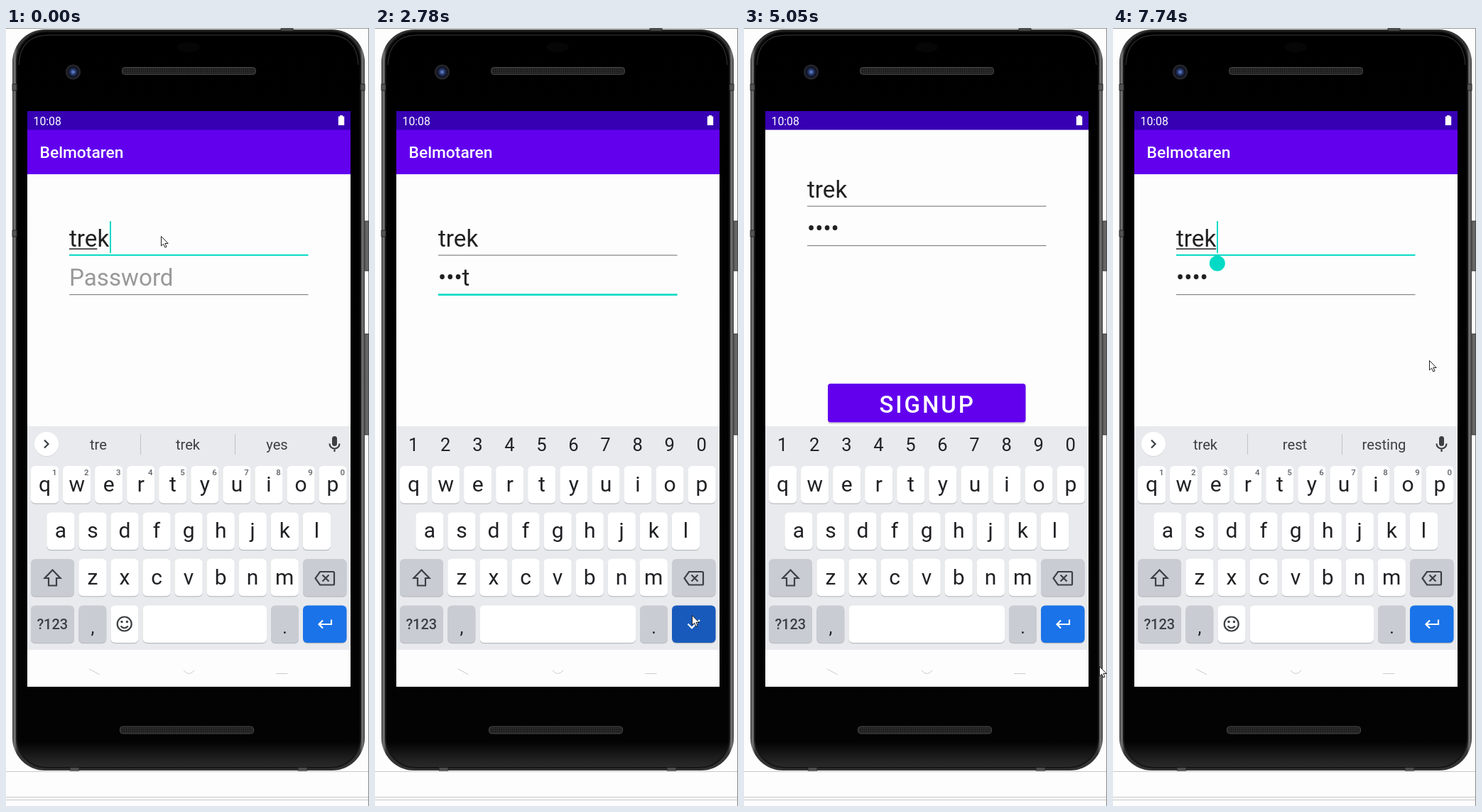
Animation of 511 by 1096 pixels, one loop 8 s. Source, as an HTML page:

```html
<!DOCTYPE html>
<html lang="en">
<head>
<meta charset="utf-8">
<title>Login form</title>
<style>
html, body { margin: 0; width: 100%; height: 100%; overflow: hidden; background: #fdfdfd }
svg { display: block; width: 100%; height: 100% }
text { font-family: Roboto, "Noto Sans", sans-serif; fill: #202124 }
.mid { text-anchor: middle }
.field { font-size: 33.2px; fill: #212121 }
.icon { fill: none; stroke: #3c4043; stroke-width: 2.2 }
.teal { fill: #03dac5 }
</style>
</head>
<body>
<svg viewBox="0 0 511 1096">
  <defs>
    <linearGradient id="metal">
      <stop offset="0" stop-color="#3a3a3a"/><stop offset=".006" stop-color="#777"/>
      <stop offset=".014" stop-color="#333"/><stop offset=".986" stop-color="#333"/>
      <stop offset=".994" stop-color="#777"/><stop offset="1" stop-color="#3a3a3a"/>
    </linearGradient>
    <linearGradient id="lip" x2="0" y2="1">
      <stop offset="0" stop-color="#000"/><stop offset=".965" stop-color="#030303"/>
      <stop offset=".985" stop-color="#1c1c1c"/><stop offset="1" stop-color="#2b2b2b"/>
    </linearGradient>
    <radialGradient id="lens">
      <stop offset="0" stop-color="#6f8fd8"/><stop offset=".35" stop-color="#26386e"/>
      <stop offset=".65" stop-color="#10131f"/><stop offset="1" stop-color="#303034"/>
    </radialGradient>
    <pattern id="mesh" width="3" height="3" patternUnits="userSpaceOnUse">
      <rect width="3" height="3" fill="#2c2c2c"/><circle cx="1.5" cy="1.5" r=".9" fill="#111"/>
    </pattern>
    <clipPath id="window"><rect x="30" y="143" width="455" height="418"/></clipPath>
  </defs>

  <!-- phone -->
  <path d="M0 .5H511" stroke="#999"/>
  <path d="M0 1047.5H511M0 1083.5H511M0 1087.5H511" stroke="#c8c8c8"/>
  <path d="M510.5 0V1096" stroke="#888"/>
  <path d="M505 272h6v70h-6zM505 431h6v142h-6z" fill="#666" stroke="#333"/>
  <rect x="9" y="2" width="496" height="1044" rx="46" fill="url(#metal)"/>
  <rect x="15" y="5" width="484" height="1037" rx="42" fill="url(#lip)" stroke="#151515" stroke-width="2"/>
  <path d="M18 52Q20 10 60 10H454Q494 10 496 52" fill="none" stroke="#272727" stroke-width="1.5"/>
  <path d="M9 79h6v9h-6zM499 79h6v9h-6zM9 285h6v9h-6zM387 1h17v3h-17zM90 1042h13v4h-13zM411 1042h13v4h-13z" fill="#555" stroke="#222"/>
  <ellipse cx="257" cy="27" rx="16" ry="7" fill="#060606"/>
  <circle cx="94.500" cy="62" r="10.5" fill="url(#lens)"/>
  <g fill="url(#mesh)" stroke="#484848">
    <rect x="163.500" y="55.500" width="188" height="10" rx="4"/>
    <rect x="160.500" y="984" width="188" height="10" rx="4"/>
  </g>

  <!-- screen -->
  <rect x="30" y="117" width="455" height="811" fill="#fdfdfd"/>
  <g clip-path="url(#window)"><g id="page">
    <rect x="30" y="143" width="455" height="63" fill="#6200ee"/>
    <text x="47.500" y="183" font-size="22.8" font-weight="500" style="fill:#fff">Belmotaren</text>
    <text id="user" class="field" x="89" y="308">trek</text>
    <rect id="spell" x="89" y="310.500" height="1.5" fill="#212121"/>
    <text id="hint" class="field" x="89" y="363" style="fill:#999">Password</text>
    <text id="pass" class="field" x="89" y="363"></text>
    <rect id="userLine" x="89" width="336.500"/>
    <rect id="passLine" x="89" width="336.500"/>
    <rect id="caret" class="teal" width="2" height="45"/>
    <path id="handle" class="teal" d="M0 0L7.800 5.200A11 11 0 1 1 -7.800 5.200Z"/>
    <rect x="118" y="572" width="278.500" height="55" rx="4" fill="#ddd"/>
    <rect x="118" y="570" width="278.500" height="54.500" rx="4" fill="#6200ee"/>
    <rect id="glow" x="118" y="570" width="278.500" height="54.500" rx="4" fill="#fff"/>
    <text x="190.500" y="610.500" font-size="33" font-weight="500" letter-spacing="2.9" style="fill:#fff">SIGNUP</text>
  </g></g>
  <rect x="30" y="117" width="455" height="26.500" fill="#3700b3"/>
  <text x="38.500" y="136.500" font-size="15.800" style="fill:#fff">10:08</text>
  <path d="M470 123h4v1.500h2.200v12.500h-8.400v-12.500h2.200z" fill="#fff"/>

  <!-- keyboard -->
  <rect x="30" y="561" width="455" height="315" fill="#e8eaed"/>
  <g id="keys"></g>
  <g id="words">
    <circle cx="57" cy="587" r="17" fill="#d5d7da"/>
    <circle cx="57" cy="586" r="17" fill="#fff"/>
    <path class="icon" d="M54 580.500l5.500 5.500l-5.500 5.500"/>
    <path d="M189.500 572V601M322.500 572V601" stroke="#bfc2c6"/>
    <rect x="459" y="575" width="7" height="14" rx="3.500" fill="#3c4043"/>
    <path class="icon" stroke-width="2" d="M455.500 585.500a7 7 0 0 0 14 0M462.500 592.500V597"/>
  </g>
  <g id="digits"></g>
  <g id="emoji"></g>
  <g class="icon">
    <path d="M65.500 763.500l11 11.500h-5.500v10.500h-11v-10.500h-5.500z"/>
    <path d="M442 766h18.500q1.500 0 1.500 1.500v15.500q0 1.500-1.500 1.500H442L435.500 775.200zM445.500 770.500l9 9M454.500 770.500l-9 9"/>
  </g>
  <g id="enter"></g>
  <path id="arrow" d="M458 833.500V840H440.500M446 834.500L440.500 840L446 845.500" fill="none" stroke="#fff" stroke-width="2.200"/>
  <path id="check" d="M440.500 839.500L446 845L457 834" fill="none" stroke="#fff" stroke-width="2.400"/>
  <path d="M117 903l15 8M250 905q7.500 9 15 0M380 909.500h16.500" fill="none" stroke="#ccc"/>
  <path id="mouse" d="M0 0V13.500L3.100 10.700L5.300 15.600L7.600 14.600L5.400 10H9.700Z" fill="#fff" stroke="#222"/>
</svg>
<script>
const $ = id => document.getElementById(id);
const set = (id, attrs) => { for (const k in attrs) $(id).setAttribute(k, attrs[k]); };
const show = (id, on) => set(id, { visibility: on ? 'visible' : 'hidden' });
const label = (x, y, size, s, extra = '') =>
  `<text class="mid" x="${x}" y="${y}" font-size="${size}" ${extra}>${s}</text>`;
const key = (x, y, w, fill = '#fff') =>
  `<rect x="${x}" y="${y + 1.3}" width="${w}" height="52.500" rx="6" fill="#b9bcc1"/>
   <rect x="${x}" y="${y}" width="${w}" height="52.500" rx="6" fill="${fill}"/>`;
const PITCH = 45.05, GREY = '#c9ccd3';

let keys = '', hints = '', digits = '';
[['qwertyuiop', 35], ['asdfghjkl', 57.3], ['zxcvbnm', 102.3]].forEach(([row, x0], r) =>
  [...row].forEach((c, i) => {
    const x = x0 + i * PITCH, y = 617 + r * 65.4;
    keys += key(x, y, 39.3) + label(x + 19.6, y + 36, 30, c);
  }));
[...'1234567890'].forEach((d, i) => {
  const x = 54.2 + i * PITCH;
  digits += label(x, 596, 25.5, d);
  hints += label(x + 14, 630, 11.5, d, 'font-weight="500" style="fill:#5f6368"');
});
keys += key(35, 748, 61, GREY) + key(418, 748, 61.5, GREY)
  + key(35, 813.5, 61, GREY) + label(65.3, 847, 20, '?123', 'font-weight="500" style="fill:#3c4043"')
  + key(102.3, 813.5, 39, GREY) + label(122, 853, 25, ',')
  + key(373, 813.5, 39, GREY) + label(392.5, 853, 25, '.')
  + key(147.5, 813.5, 219.5);
$('keys').innerHTML = keys;
$('digits').innerHTML = digits;
$('words').innerHTML += hints + [130, 256, 381.5].map((x, i) =>
  label(x, 594, 20.2, '', `id="word${i}" style="fill:#3c4043"`)).join('');
$('emoji').innerHTML = '<rect x="147" y="813" width="221" height="55" fill="#e8eaed"/>'
  + key(147.5, 813.5, 39) + key(192.700, 813.5, 174.300)
  + `<circle class="icon" cx="166.700" cy="839.500" r="10"/>
     <path class="icon" d="M161.500 842.500q5.200 5.500 10.400 0"/>
     <circle cx="163" cy="836.500" r="1.700" fill="#3c4043"/><circle cx="170.400" cy="836.500" r="1.700" fill="#3c4043"/>`;
$('enter').innerHTML = key(418, 813.5, 61.5, '#1a73e8');
const enterFace = $('enter').lastElementChild;

const steps = [0, ...[[270, 1050, 7], [1340, 1460, 2], [1780, 2780, 8], [2930, 3050, 2],
  [3180, 3960, 7], [4240, 4240, 1], [4630, 5610, 8], [5730, 5850, 2], [6530, 6940, 4], [7220, 7740, 5]]
  .flatMap(([a, b, n]) => Array.from({ length: n }, (_, i) =>
    n > 1 ? Math.round((a + (b - a) * i / (n - 1)) / 10) * 10 : a))];

const path = [[0, 218, 293], [270, 218, 293], [790, 186, 350], [1920, 186, 350], [2640, 447, 831],
  [2930, 445, 822], [3050, 432, 778], [3440, 418, 600], [3960, 421, 401], [4240, 445, 444],
  [4910, 490, 820], [5050, 500, 899], [5190, 470, 883], [5610, 372, 481], [5730, 372, 440],
  [5850, 372, 399], [6800, 228, 285], [6940, 222, 282], [7220, 222, 240], [7740, 445, 468]];
const clamp = x => Math.min(1, Math.max(0, x));
const slide = x => 1 - (1 - clamp(x)) ** 2;

function mouseAt(t) {
  const i = path.findIndex(p => p[0] >= t);
  if (i < 1) return path[0].slice(1);
  const [a, b] = [path[i - 1], path[i]], k = (t - a[0]) / (b[0] - a[0]);
  return [a[1] + (b[1] - a[1]) * k, a[2] + (b[2] - a[2]) * k];
}

function line(id, y, on) {
  const thick = id === 'passLine' ? 2.6 : 2;
  set(id, { y: on ? y - .6 : y, height: on ? thick : 1.2, fill: on ? '#03dac5' : '#858585' });
}

function draw(t) {
  const focus = t < 920 || t >= 7220 ? 'user' : t < 2930 || t >= 6940 ? 'pass' : '';
  const onUser = focus === 'user', onPass = focus === 'pass';
  const numeric = t >= 1340 && t < 7350;
  const typed = [1340, 1460, 1780, 1920].filter(s => t >= s).length;

  const pan = 69 * (slide((t - 2855) / 250) - slide((t - 7145) / 250));
  set('page', { transform: `translate(0 ${-pan})` });

  $('pass').textContent = t >= 2930 ? '••••' : typed ? '•'.repeat(typed - 1) + 'text'[typed - 1] : '';
  show('hint', !typed);
  line('userLine', 319.5, onUser);
  line('passLine', 375, onPass);
  set('spell', { width: onUser ? $('user').getSubStringLength(0, t < 270 ? 3 : 4) : 0 });

  const end = onUser ? 146 : 89.3 + (typed ? $('pass').getComputedTextLength() : 0);
  const blinkOff = t >= 480 && t < 920 || t >= 2420 && t < 2930;
  set('caret', { x: end, y: onUser ? 272 : 327 });
  show('caret', focus && !blinkOff);
  set('handle', { transform: `translate(${end + .8} ${onUser ? 318.5 : 374})` });
  show('handle', t >= 6940);
  set('glow', { opacity: t < 2930 ? 0 : .24 * (1 - clamp((t - 3050) / 390)) });

  show('words', !numeric);
  show('emoji', !numeric);
  show('digits', numeric);
  (t < 270 ? ['tre', 'trek', 'yes'] : ['trek', 'rest', 'resting'])
    .forEach((w, i) => $('word' + i).textContent = w);

  const done = numeric && (t < 2930 || t >= 6940);
  show('check', done);
  show('arrow', !done);
  enterFace.setAttribute('fill', t >= 2780 && t < 2930 ? '#185abc' : '#1a73e8');
  set('mouse', { transform: `translate(${mouseAt(t).map(v => Math.round(v) + .5)})` });
}

function tick() {
  const now = performance.now() % 8000;
  draw(steps.filter(s => s <= now).pop());
  requestAnimationFrame(tick);
}
tick();
</script>
</body>
</html>
```
